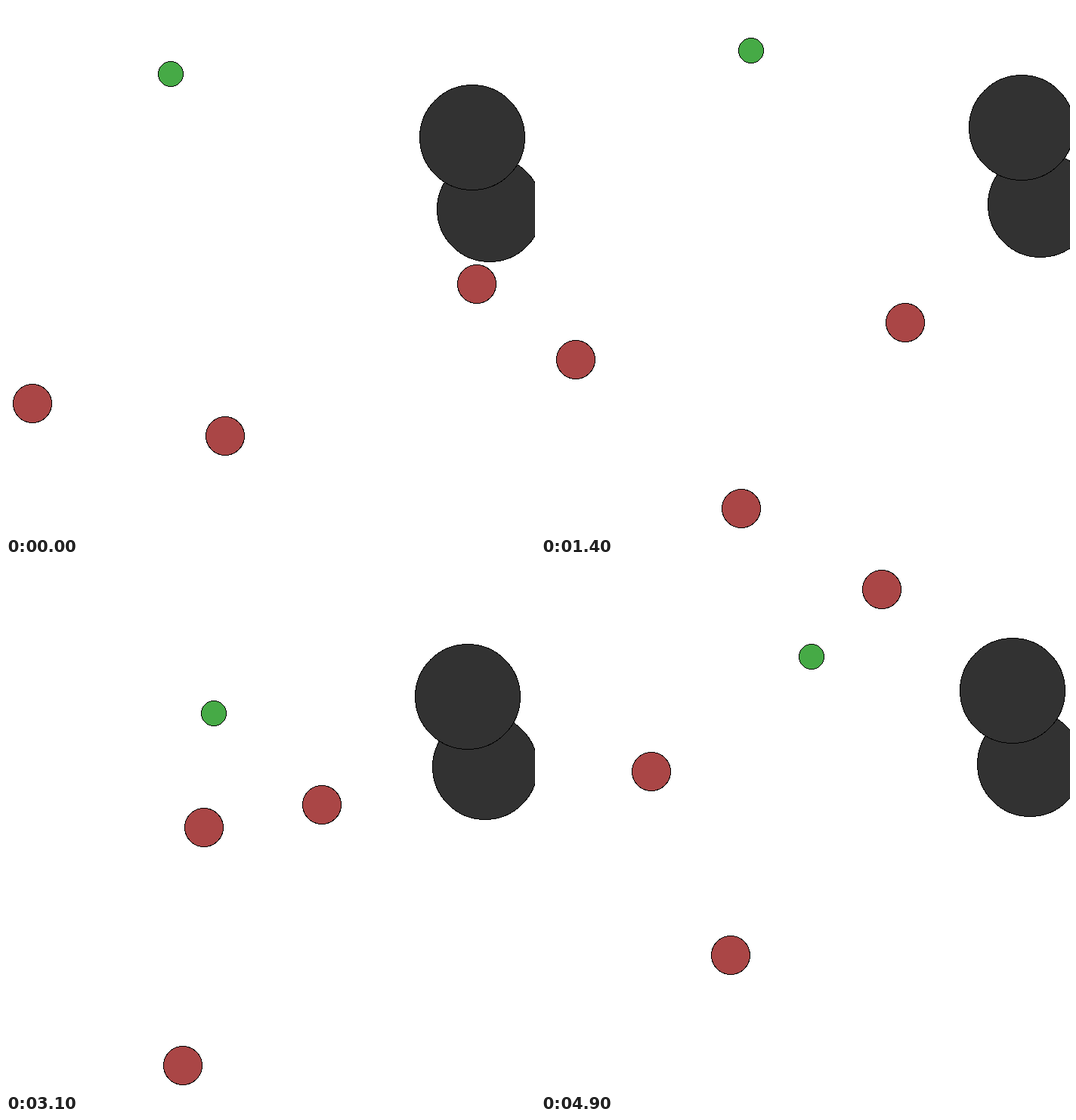
These frames come from a looping animation (700 by 700 pixels, 5000 ms). An HTML page:

```html
<!DOCTYPE html>
<html lang="en">
<head>
<meta charset="utf-8">
<title>Pursuit</title>
<style>
  html, body { margin: 0; width: 100%; height: 100%; overflow: hidden; background: #fff; }
  svg { display: block; width: 100%; height: 100%; }
  circle { stroke: #000; stroke-width: 1; shape-rendering: crispEdges; }
</style>
</head>
<body>
<svg viewBox="0 0 700 700"></svg>
<script>
const STEP = 100, STEPS = 50, MID = 350, REACH = 315;

// Steps at which the movers pass their waypoints
const stops = [0, 6, 14, 25, 31, 37, 42, 49];

const chaser = (...path) => ({ r: 26, fill: 'rgb(170,70,70)', path });
const runner = (...path) => ({ r: 17, fill: 'rgb(70,170,70)', path });
const rock = (x, y) => ({ r: 70, fill: 'rgb(50,50,50)', path: [[x, y]] });

// World positions, the middle of the stage is 0, 0
const bodies = [
  chaser([-1.086, .608], [-1.1475, .61], [-.974, .38], [-.63, .125],
         [-.308, .002], [-.257, -.27], [-.476, -.31], [-.683, -.247]),
  chaser([-.205, .757], [-.228, .803], [-.271, 1.0112], [-.21, 1.1115],
         [-.406, 1.108], [-.404, 1.006], [-.38, .813], [-.331, .569]),
  chaser([.943, .064], [.774, .188], [.425, .223], [.256, -.094],
         [.241, -.104], [-.053, -.279], [-.04, -.62], [.341, -1.058]),
  runner([-.453, -.895], [-.421, -.738], [-.23, -.933], [-.263, -.612],
         [-.262, -.529], [-.49, -.624], [-.27, -.79], [.028, -.757]),
  rock(1, -.279),
  rock(.921, -.6067)
];

const svg = document.querySelector('svg');
for (const b of bodies) {
  b.el = document.createElementNS('http://www.w3.org/2000/svg', 'circle');
  b.el.setAttribute('r', b.r - .5);
  b.el.setAttribute('fill', b.fill);
  svg.append(b.el);
}

const span = i => stops[i + 1] - stops[i];
const rate = (path, i, axis) => (path[i + 1][axis] - path[i][axis]) / span(i);

function slope(path, i, axis) {
  if (i === 0) return rate(path, 0, axis);
  if (i === path.length - 1) return rate(path, i - 1, axis);
  const before = span(i - 1), after = span(i);
  return (rate(path, i - 1, axis) * after + rate(path, i, axis) * before) / (before + after);
}

// Smooth curve through the waypoints
function place(path, t) {
  if (path.length === 1) return path[0];
  let i = 0;
  while (i < path.length - 2 && t >= stops[i + 1]) i++;
  const h = span(i), u = (t - stops[i]) / h, w = 1 - u;
  return [0, 1].map(axis =>
    path[i][axis] * w * w * (1 + 2 * u) + path[i + 1][axis] * u * u * (3 - 2 * u)
    + h * u * w * (slope(path, i, axis) * w - slope(path, i + 1, axis) * u));
}

// The view zooms so that the farthest body just fits
function draw(t) {
  const spots = bodies.map(b => place(b.path, t));
  const zoom = REACH / Math.max(...spots.flat().map(Math.abs));
  const pixel = v => MID + Math.floor(v * zoom + 1e-6);
  bodies.forEach((b, i) => {
    b.el.setAttribute('cx', pixel(spots[i][0]));
    b.el.setAttribute('cy', pixel(spots[i][1]));
  });
}

const start = performance.now();
let last = 0;
function tick() {
  const t = Math.floor((performance.now() - start) / STEP) % STEPS;
  if (t !== last) draw(last = t);
  requestAnimationFrame(tick);
}
draw(0);
requestAnimationFrame(tick);
</script>
</body>
</html>
```
